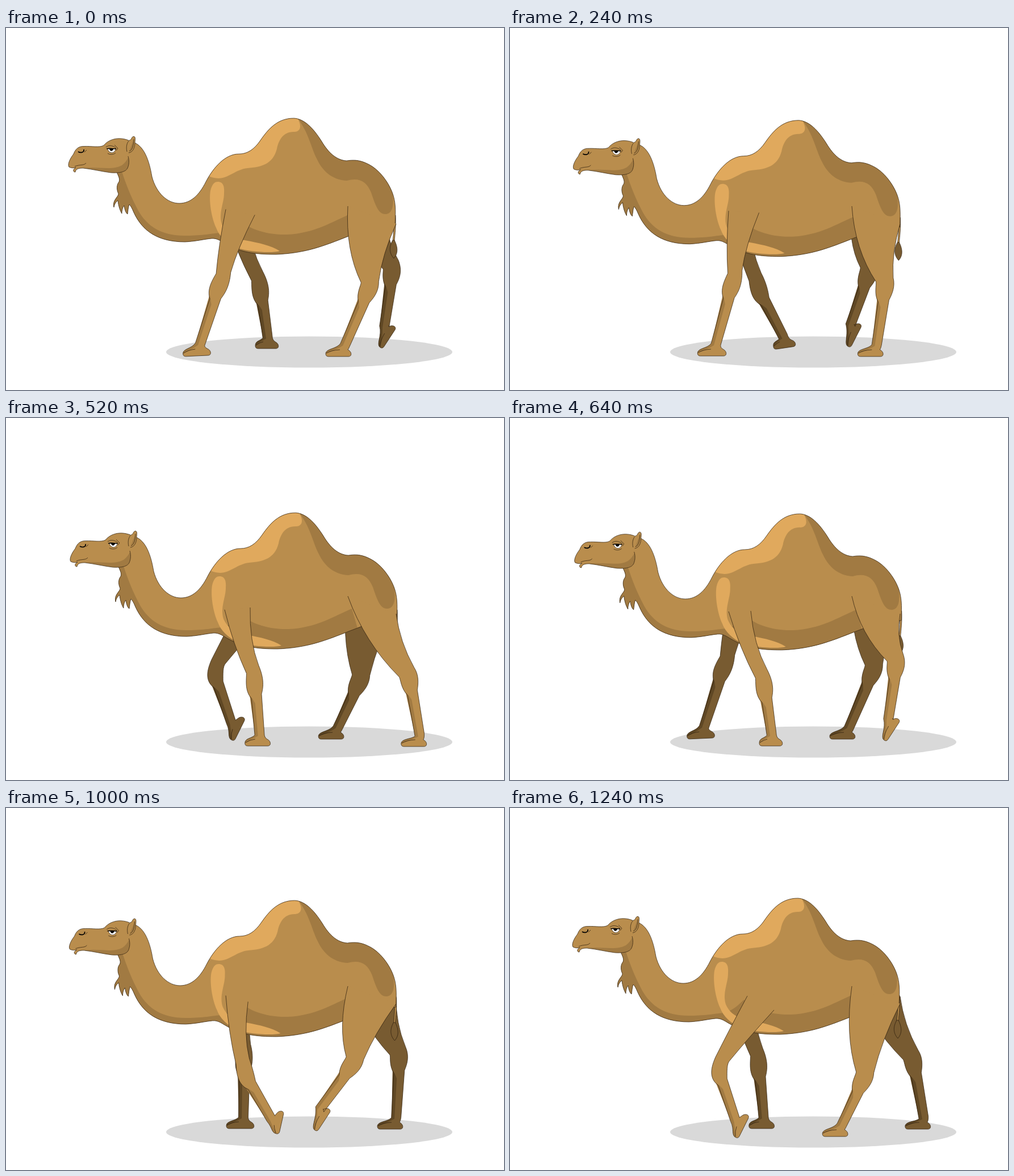
Write an HTML page with a canvas that moves like this. It is 877 px wide and 638 px high and loops after 1280 ms.

```html
<!DOCTYPE html>
<html lang="en">
<head>
<meta charset="utf-8">
<title>Walking camel</title>
<style>
html, body { margin: 0; width: 100%; height: 100%; overflow: hidden; background: #fff; }
canvas { display: block; }
</style>
</head>
<body>
<canvas id="stage" width="877" height="638"></canvas>
<script>
const ctx = document.getElementById('stage').getContext('2d');
const { cos, sin, hypot, max, PI } = Math;
const LINE = '#2a1c0c', LIGHT = '#e0a95d', BASE = '#b98d4d', SHADE = '#a17a42';
const DARK = '#785b31', DARKEST = '#5f4724';
const NEAR = { fill: BASE, shade: SHADE }, FAR = { fill: DARK, shade: DARKEST };

const shapes = Object.fromEntries(Object.entries({
  body: `M195 254C198 261 201 266 199 271C194 277 195 286 198 292C198 298 187 303 190 316
    C191 310 194 306 197 304C198 314 201 322 204 327C204 320 206 315 208 313
    C209 320 211 326 214 328C215 322 215 316 217 311Q220 313 225 325
    C240 358 268 377 315 377C335 376 350 372 362 371C373 370 380 377 390 382
    C413 395 437 399 475 399C528 397 560 384 603 367Q630 357 645 350L685 347
    C686 330 687 311 682 295C677 278 663 256 645 244C626 232 613 232 600 234
    C582 233 568 220 556 200C541 176 525 160 507 159C478 159 462 178 448 198
    C437 214 425 222 410 222C386 222 365 246 352 271C340 295 325 309 305 309
    C285 309 265 292 257 262C252 232 243 209 226 202L210 204Z`,
  bellyShade: `M203 250C211 275 221 300 233 322C249 350 275 367 318 366C346 366 362 362 378 361
    C395 355 402 347 412 338C424 352 455 365 495 364C543 362 575 341 606 328L630 410H200L180 260Z`,
  chestLight: `M373 271C383 271 385 280 384 292C384 308 374 326 380 346C388 364 402 370 420 374
    C447 379 466 383 482 393C470 397 430 395 408 388C388 380 375 366 370 352
    C362 335 357 305 360 287C363 275 367 271 373 271Z`,
  humpLight: `M507 150C521 167 522 182 508 183C488 182 480 198 477 213C470 240 450 245 425 247
    C405 249 392 265 374 265C362 264 357 262 353 256L400 200L460 150Z`,
  humpShade: `M511 156C532 181 537 210 547 230C560 258 580 268 600 269C622 263 635 270 643 290
    C650 310 655 328 668 328C681 328 683 312 681 293L700 250L600 200L560 150Z`,
  head: `M216 198C198 191 181 196 172 207C165 211 150 208 138 208.500C127 208 122 214 119 222
    C112 231 108 241 111 245C115 247 119 247 123 246C117 249 118 254 122 254
    C123 248 128 247 136 247C153 249 169 253 185 255C202 256 211 253 214 247C217 240 217 233 215 226`,
  jawShade: 'M134 247C160 243 186 252 204 242Q211 237 216 227C219 246 213 255 190 255C172 254 155 248 134 247Z',
  ear: `M213 218C211 209 213 202 217 198C222 197 220 192 225 191C229 192 227 198 227 204
    C226 214 222 219 216 220`,
  earFold: 'M225 196C225 208 222 216 217 217',
  face: `M121 244C130 240 137 243 141 238M138 219L142 215M176 210C182 205 190 208 194 212
    M179 221C184 224 190 223 193 220M191 206L197 212L194 216`,
  eye: 'M179 213H193C192 222 181 222 179 213Z',
  lid: 'M177 213C182 211 188 213 194 213',
  pupil: 'M182 213H189C188 218 183 218 182 213Z',
  nostril: 'M127 218C132 221 138 219 137 214',
  strand: 'M686 330C687 350 685 362 684 376L681 376C683 360 683 350 683 332',
  tuft: 'M681 374C676 383 673 395 683 406C692 396 689 384 684 374Z'
}).map(([name, d]) => [name, new Path2D(d)]));

// Periodic curve: mean plus [harmonic, cosine, sine] terms
const wave = (phase, mean, ...terms) =>
  terms.reduce((sum, [n, c, s = 0]) => sum + c * cos(n * phase) + s * sin(n * phase), mean);
// Smooth bump around one moment of the stride
const bump = (phase, peak, power) => max(0, cos(phase - peak)) ** power;
const middle = (a, b, dx = 0, dy = 0) => [(a[0] + b[0]) / 2 + dx, (a[1] + b[1]) / 2 + dy];

// Coordinates along a bone and outwards to the camel's front
function bone(origin, from, to) {
  const len = hypot(to[0] - from[0], to[1] - from[1]);
  const ux = (to[0] - from[0]) / len, uy = (to[1] - from[1]) / len;
  return (along, out) => [origin[0] + ux * along - uy * out, origin[1] + uy * along + ux * out];
}

function frontPose(phase) {
  const swing = bump(phase, 1.6 * PI, 3), reach = bump(phase, 1.75 * PI, 8);
  const sway = cos(phase) + sin(phase);
  return {
    hip: [385 + 33 * reach, 330 - 11 * cos(phase) + 9 * reach],
    rump: [430 + 6 * sway + 35 * reach, 334 - 6 * sway + 22 * reach],
    knee: [wave(phase, 410, [1, -38, 6], [2, -3, 6.5], [3, 3, 5], [4, 4]), wave(phase, 458, [1, -10, -6])],
    ankle: [wave(phase, 422, [1, -60, -25], [2, -21]), 560 - 12 * swing],
    tilt: -PI / 2 * swing, toe: -26 - 4 * sway, heel: 19,
    cuff: [-13, 10], calf: [-22, -14], bow: [-4, 6], sag: [-9, 8]
  };
}

function hindPose(phase, tuck = 0) {
  const swing = bump(phase, 1.25 * PI, 0.3);
  return {
    hip: [602, 314], rump: [687 - tuck * swing, 345],
    knee: [wave(phase, 656, [1, -20, 40], [2, 4, -10]), wave(phase, 449, [1, 13], [2, -3, -11], [4, -4])],
    ankle: [wave(phase, 632, [1, -35, 68], [2, 6, -17], [4, -7]), 561 - 31 * swing],
    tilt: -1.1 * swing, toe: -33, heel: 12,
    cuff: [-6, 15], calf: [-9, -16], bow: [-16, 10], sag: [-9, 3]
  };
}

function paint(path, fill, stroke, width = 0.7) {
  if (fill) { ctx.fillStyle = fill; ctx.fill(path); }
  if (stroke) { ctx.strokeStyle = stroke; ctx.lineWidth = width; ctx.stroke(path); }
}

function leg({ hip, rump, knee, ankle, tilt, toe, heel, cuff, calf, bow, sag }, tone, dy = 0) {
  const thigh = bone(knee, middle(hip, rump), knee), shin = bone(knee, knee, ankle);
  const len = hypot(ankle[0] - knee[0], ankle[1] - knee[1]);
  const foot = bone(ankle, [0, 0], [cos(tilt), sin(tilt)]);
  const kneeFront = thigh(...cuff), kneeRear = thigh(...calf);

  const outline = new Path2D();
  outline.moveTo(...hip);
  outline.quadraticCurveTo(...middle(hip, kneeFront, ...bow), ...kneeFront);
  outline.bezierCurveTo(...shin(4, 14), ...shin(19, 17), ...shin(33, 7.5));
  outline.lineTo(...shin(len - 2, 8.5));
  outline.bezierCurveTo(...foot(-14, 5), ...foot(toe, 4), ...foot(toe, 13));
  outline.quadraticCurveTo(...foot(toe, 18), ...foot(toe + 5, 18));
  outline.lineTo(...foot(heel - 5, 18));
  outline.bezierCurveTo(...foot(heel + 2, 18), ...foot(heel + 1, 9), ...foot(heel - 6, 6));
  outline.quadraticCurveTo(...foot(8, 3), ...shin(len - 3, -8.5));
  outline.lineTo(...shin(27, -11));
  outline.bezierCurveTo(...shin(16, -15), ...shin(2, -19), ...kneeRear);
  outline.quadraticCurveTo(...middle(kneeRear, rump, ...sag), ...rump);

  const strip = new Path2D();
  strip.moveTo(...shin(27, 10));
  strip.quadraticCurveTo(...shin(34, 5), ...shin(42, 2));
  strip.lineTo(...shin(len, 3));
  strip.quadraticCurveTo(...foot(-14, 6), ...foot(toe + 1, 13));
  strip.bezierCurveTo(...foot(toe, 4), ...foot(-14, 5), ...shin(len - 2, 8));

  const crease = new Path2D();
  crease.moveTo(...foot(toe + 1, 12));
  crease.quadraticCurveTo(...foot(toe + 9, 7), ...foot(-8, 6));

  ctx.save();
  ctx.translate(0, dy);
  paint(outline, tone.fill);
  paint(strip, tone.shade);
  paint(crease, null, LINE);
  paint(outline, null, LINE);
  ctx.restore();
}

function drawTail() {
  paint(shapes.strand, BASE, LINE);
  paint(shapes.tuft, DARK, LINE);
}

function drawBody() {
  paint(shapes.body, BASE);
  ctx.save();
  ctx.clip(shapes.body);
  paint(shapes.bellyShade, SHADE);
  paint(shapes.humpShade, SHADE);
  paint(shapes.humpLight, LIGHT);
  paint(shapes.chestLight, LIGHT);
  ctx.restore();
  paint(shapes.body, null, LINE);

  paint(shapes.head, BASE);
  ctx.save();
  ctx.clip(shapes.head);
  paint(shapes.jawShade, SHADE);
  ctx.restore();
  paint(shapes.head, null, LINE);
  paint(shapes.ear, BASE, LINE);
  paint(shapes.earFold, SHADE, LINE);
  paint(shapes.face, null, LINE);
  paint(shapes.eye, '#fff', LINE);
  paint(shapes.pupil, '#000');
  paint(shapes.lid, null, '#000', 1.3);
  paint(shapes.nostril, null, '#000', 1.7);
}

function draw(ms) {
  const tick = Math.floor(ms % 1280 / 40);
  const drop = tick < 16 ? tick / 16 : (31 - tick) / 15;
  // The legs change pose eight times per stride; the far pair is half a stride behind
  const near = Math.floor(tick / 4) * PI / 4, far = near + PI;

  ctx.fillStyle = '#fff';
  ctx.fillRect(0, 0, 877, 638);
  ctx.fillStyle = '#d9d9d9';
  ctx.beginPath();
  ctx.ellipse(534, 571, 252, 27.5, 0, 0, 2 * PI);
  ctx.fill();

  leg(frontPose(far), FAR, -13);
  leg(hindPose(far, 18), FAR, -13 + 9 * bump(far, 1.25 * PI, 0.3));

  ctx.save();
  ctx.translate(3.7 * drop, 9.9 * drop);
  drawTail();
  drawBody();
  ctx.restore();

  leg(hindPose(near), NEAR);
  leg(frontPose(near), NEAR);
}

const start = performance.now();
function loop() {
  draw(performance.now() - start);
  requestAnimationFrame(loop);
}
loop();
</script>
</body>
</html>
```
